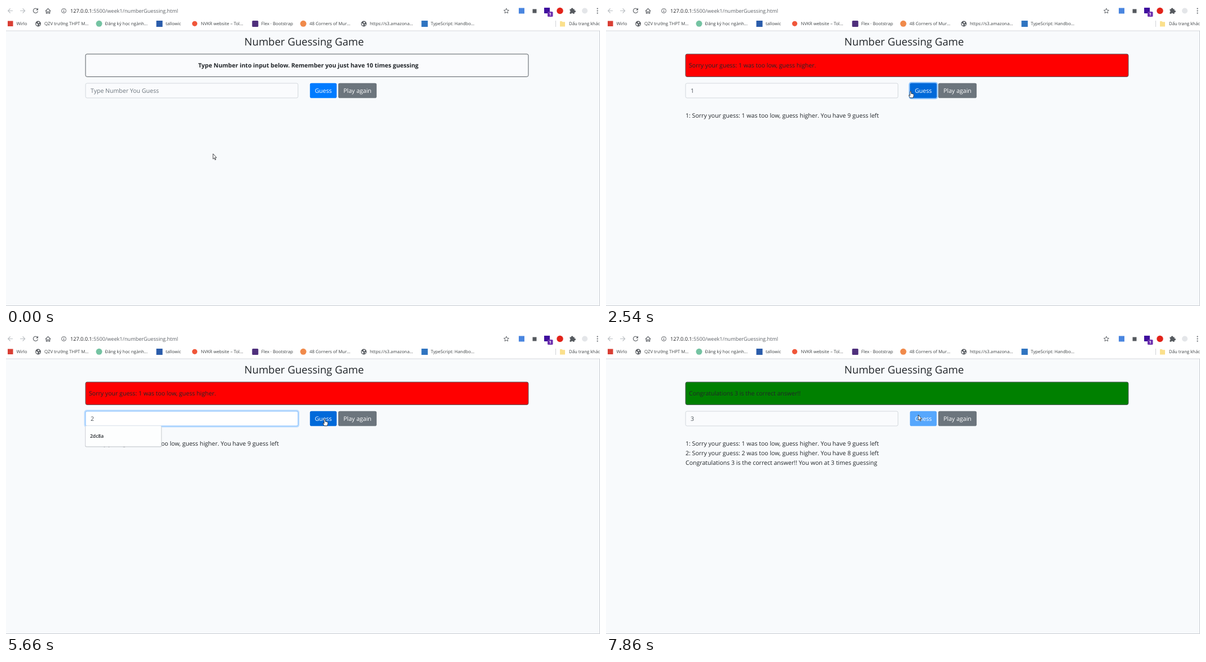
An HTML page that plays this animation: 1053 by 532 pixels, repeating every 8 s.

```html
<!DOCTYPE html>
<html lang="en">
<head>
<meta charset="utf-8">
<title>Number Guessing Game</title>
<style>
  html, body { margin: 0; width: 100%; height: 100%; overflow: hidden; background: #f8fafc; }
  svg { display: block; width: 1053px; height: 532px; }
  text { font: 10.57px "Open Sans", "Noto Sans", sans-serif; fill: #212529; text-rendering: geometricPrecision; white-space: pre; }
  #bar text { font-size: 7.8px; fill: #3c4043; }
  #bar .url { font-size: 9.13px; fill: #5f6368; }
  #bar .host { fill: #202124; }
  #bar .badge { font-size: 7px; font-weight: 700; fill: #fff; }
  .line { fill: none; stroke: #5f6368; stroke-width: 1.2; }
  .off { stroke: #bcc0c4; }
  .title { font-size: 18.5px; font-weight: 500; text-anchor: middle; }
  .hint { font-size: 10.5px; font-weight: 700; text-anchor: middle; }
  .btn { fill: #fff; text-anchor: middle; }
  #list text { font-size: 8.5px; font-weight: 600; }
  .pointer { fill: #fff; stroke: #26282b; stroke-width: .85; stroke-linejoin: round; }
</style>
</head>
<body>
<svg viewBox="0 0 1053 532">
  <defs>
    <g id="globe">
      <circle r="4.9" fill="#55595e"/>
      <path d="M-3.6-1.2 L-1 .2 L-.4 2 L-1.6 3.6 Q-4.2 1.8-3.6-1.2Z M0-3.8 L2.6-2.6 L1.4-.8 L-1-1.4Z M1.4 1 L3.7.6 Q3.2 2.8 1.8 3.3Z" fill="#fff"/>
    </g>
  </defs>
  <rect width="1053" height="532" fill="#f8fafc"/>

  <g id="bar">
    <rect width="1053" height="44" fill="#fff"/>
    <path d="M0 44H1053" stroke="#d5d8dc"/>
    <path class="line off" d="M12 8.5H3.6M7.6 4.5L3.6 8.5L7.6 12.5M25 8.5H33.6M29.6 4.5L33.6 8.5L29.6 12.5"/>
    <path class="line" d="M55.3 5.4A4.1 4.1 0 1 0 56.4 9.4"/>
    <path d="M57 3.6V7.6H53Z" fill="#5f6368"/>
    <path class="line" d="M70 9L74.5 4.6L79 9M71.4 8.2V12.8H73.4V10H75.6V12.8H77.6V8.2"/>
    <circle class="line" cx="102.5" cy="8.5" r="4" style="stroke-width:1"/>
    <path class="line" d="M102.5 8V11M102.5 6V7.1"/>
    <text class="url" x="114" y="12"><tspan class="host">127.0.0.1</tspan>:5500/week1/numberGuessing.html</text>

    <path class="line" style="stroke-width:1" d="M887 4.2L888.3 7.2L891.5 7.5L889.1 9.6L889.8 12.7L887 11.1L884.2 12.7L884.9 9.6L882.5 7.5L885.7 7.2Z"/>
    <rect x="909" y="3.5" width="10" height="10" fill="#4a86e0"/>
    <rect x="933.5" y="5.5" width="7" height="7" fill="#55595e"/>
    <rect x="954" y="3" width="10" height="10" fill="#3f0f9e"/>
    <rect x="960" y="10" width="9.5" height="9" rx="1.5" fill="#6b2fae"/>
    <text class="badge" x="962.7" y="17.2">1</text>
    <circle cx="982" cy="8.5" r="5.7" fill="#e2231a"/>
    <path d="M999.5 5.5H1002A1.7 1.7 0 1 1 1005.3 5.5H1007.7V8A1.7 1.7 0 1 1 1007.7 11.2V13.7H1005.2A1.7 1.7 0 0 0 1002 13.7H999.5V11A1.6 1.6 0 0 0 999.5 8Z" fill="#55595e"/>
    <circle cx="1026" cy="8.5" r="5" fill="#e4e6e9"/>
    <g fill="#5f6368"><circle cx="1048.5" cy="4.6" r="1.1"/><circle cx="1048.5" cy="8.6" r="1.1"/><circle cx="1048.5" cy="12.6" r="1.1"/></g>

    <rect x="3" y="26.5" width="9.5" height="9.5" fill="#d93f34"/>
    <text x="18.5" y="34">Wirlo</text>
    <use href="#globe" x="57" y="31.5"/>
    <text x="68" y="34">QZV trường THPT M...</text>
    <circle cx="165" cy="31.3" r="5.5" fill="#74c3a2"/>
    <text x="175.5" y="34">Đăng ký học ngành...</text>
    <rect x="266.5" y="26" width="11" height="11" fill="#2a5caa"/>
    <text x="283" y="34">tallowic</text>
    <circle cx="334.5" cy="31.3" r="4.6" fill="#f0563a"/>
    <text x="345.5" y="34">NVKR website – Tol...</text>
    <rect x="436.3" y="26" width="11" height="11" rx="1.5" fill="#4f2f7c"/>
    <text x="452.5" y="34">Flex · Bootstrap</text>
    <circle cx="527" cy="31.3" r="5.5" fill="#f08a4b"/>
    <text x="538" y="34">48 Corners of Mur...</text>
    <use href="#globe" x="634.3" y="31.5"/>
    <text x="645" y="34">https://s3.amazona...</text>
    <rect x="736.5" y="26" width="11.2" height="11" fill="#2f74c0"/>
    <text x="753" y="34">TypeScript: Handbo...</text>
    <path d="M974.5 26V37" stroke="#d0d3d7"/>
    <path d="M982 27H985.5L986.6 28.2H991V36.5H982Z" fill="#fbe08c"/>
    <text x="998" y="34">Dấu trang khác</text>
  </g>
  <path d="M1052.5 44V531.5H0" fill="none" stroke="#c9cdd2"/>

  <text class="title" x="528.5" y="69.6">Number Guessing Game</text>
  <rect id="alert" x="141" y="85.2" width="785" height="40.2" rx="2.8" stroke="#454b51" stroke-width=".9"/>
  <text class="hint" id="hint" x="536" y="109.4">Type Number into input below. Remember you just have 10 times guessing</text>
  <text id="result" x="147" y="109.4"></text>

  <rect id="ring" x="138.5" y="134.6" width="381.5" height="31" rx="4.5" fill="#007bff" fill-opacity=".25"/>
  <rect id="field" x="141" y="137" width="376.7" height="26" rx="2.8" stroke-width=".9"/>
  <text id="value" x="150" y="154.4"></text>
  <path id="caret" stroke="#33373b" stroke-width=".9"/>

  <rect id="btnRing" x="536.7" y="134.7" width="51.6" height="30.6" rx="4.5" fill="#268fff" fill-opacity=".5"/>
  <g id="guess">
    <rect id="face" x="538.8" y="136.8" width="47.4" height="26.4" rx="2.8"/>
    <text class="btn" x="562.5" y="154.2">Guess</text>
  </g>
  <rect x="589" y="136.8" width="68" height="26.4" rx="2.8" fill="#6c757d"/>
  <text class="btn" x="623" y="154.2">Play again</text>

  <g id="log">
    <text x="141" y="198.4">1: Sorry your guess: 1 was too low, guess higher. You have 9 guess left</text>
    <text x="141" y="215.1">2: Sorry your guess: 2 was too low, guess higher. You have 8 guess left</text>
    <text x="141" y="231.8">Congratulations 3 is the correct answer!! You won at 3 times guessing</text>
  </g>

  <g id="list">
    <rect id="shade" x="140.2" y="163.5" width="136" rx="2.5" fill="#c3c7cb"/>
    <rect id="sheet" x="140.9" y="162.6" width="134.4" rx="2" fill="#fdfefe" stroke="#d5d9dd" stroke-width=".6"/>
    <g id="items"></g>
  </g>

  <g id="cursor">
    <path id="arrow" class="pointer" d="M0 0V9.3L2.1 7.4L3.6 10.9L5 10.3L3.5 7H6.3Z"/>
    <path id="beam" d="M-2.3-5.6H-.5L0-5.1L.5-5.6H2.3M0-5.1V5.1M-2.3 5.6H-.5L0 5.1L.5 5.6H2.3" fill="none" stroke="#2b2e31" stroke-width=".95"/>
    <path id="hand" class="pointer" d="M-1 .5Q0-.7 1 .5V4.2Q2-.0+3.4 2.8 4.3 2.8 4.4 4.2 5.6 4.2 5.6 5.4V8.4Q5.4 10 4.4 11.8H-.8L-3 8Q-3.4 6.6-2.2 6.8L-1 8Z"/>
  </g>
</svg>
<script>
const LOOP = 8000;
const $ = id => document.getElementById(id);
const set = (id, attrs) => { for (const k in attrs) $(id).setAttribute(k, attrs[k]); };
const show = (el, on) => { el.style.display = on ? '' : 'none'; };

$('hand').setAttribute('d', 'M-1 .6Q0-.6 1 .6V4.2L4.4 4.9Q5.5 5.2 5.5 6.4V8.4L4.4 11.8H-.8L-3 8Q-3.3 6.6-2.2 6.8L-1 8Z');

// Pointer steps: time, x, y, shape
const moves = [
  [0, 367, 262, 'arrow'], [280, 373, 244, 'arrow'], [420, 377, 218, 'arrow'], [550, 381, 176, 'arrow'],
  [670, 382, 144, 'beam'], [820, 377.7, 152, 'beam'], [1690, 449, 145, 'beam'],
  [1840, 529, 148, 'arrow'], [2120, 531, 148, 'arrow'], [2270, 540, 151, 'hand'],
  [2780, 465.7, 138.8, 'beam'], [4750, 490, 138, 'beam'], [4870, 545, 129, 'arrow'],
  [5000, 588, 139, 'arrow'], [5150, 588, 158, 'arrow'], [5280, 585, 175, 'arrow'],
  [5420, 577, 172, 'arrow'], [5540, 566, 156, 'hand'], [5660, 565, 151, 'hand'],
  [6050, 545, 152, 'hand'], [6200, 510, 157, 'beam'], [6330, 497.7, 156.7, 'beam'],
  [7220, 508, 155, 'beam'], [7340, 526, 151, 'arrow'], [7460, 541, 150, 'hand'],
  [7610, 554, 144, 'hand'], [7860, 553.5, 143.5, 'arrow']
];

const BLUE = '#007bff', HOVER = '#0069d9', MID = '#0073ee', ACTIVE = '#0062cc';
const start = { value: '', caret: 0, ring: 0, btnRing: 0, face: BLUE, list: '', rows: 0, disabled: false };

// Page steps: each patch is merged into the state
const steps = [
  [820, { caret: 1, list: '7e30d 2dc8a b40df d448b 5fbf6 3dfca' }],
  [980, { ring: 1 }],
  [1130, { value: '1', list: '' }],
  [1690, { caret: 0 }],
  [2270, { caret: 1 }],
  [2400, { caret: 0, ring: .5, btnRing: .3, face: MID }],
  [2540, { ring: 0, btnRing: 1, face: HOVER, rows: 1 }],
  [2780, { face: BLUE }],
  [3330, { ring: 1, btnRing: 0, caret: 1 }],
  [3760, { caret: 0 }],
  [4040, { value: '2', caret: 1, list: '2dc8a' }],
  [4600, { caret: 0 }],
  [5150, { caret: 1 }],
  [5540, { face: MID }],
  [5660, { face: HOVER, caret: 0 }],
  [5810, { ring: .5, btnRing: .5, face: ACTIVE, list: '' }],
  [5930, { ring: 0, btnRing: 1, face: HOVER, rows: 2 }],
  [6330, { ring: .6, btnRing: 0, face: MID, caret: 1, list: '2dc8a' }],
  [6480, { ring: 1, face: BLUE }],
  [6760, { value: '3', list: '3dfca' }],
  [7220, { caret: 0 }],
  [7610, { ring: .4, btnRing: .5, face: HOVER, list: '' }],
  [7730, { ring: 0, btnRing: 0, face: BLUE, rows: 3, disabled: true }]
];

function drawList(names) {
  show($('list'), names);
  if (!names) return;
  const items = names.split(' '), height = 11.7 + 25.1 * items.length;
  set('sheet', { height });
  set('shade', { height: height + .3 });
  $('items').innerHTML = items.map((s, i) => `<text x="149" y="${183.7 + 25.1 * i}">${s}</text>`).join('');
}

function drawPage(s) {
  const won = s.rows === 3;
  set('alert', { fill: won ? '#008000' : s.rows ? '#ff0000' : '#fafbfd' });
  show($('hint'), !s.rows);
  $('result').textContent = won ? 'Congratulations 3 is the correct answer!!'
    : s.rows ? `Sorry your guess: ${s.rows} was too low, guess higher.` : '';
  [...$('log').children].forEach((row, i) => show(row, i < s.rows));

  set('ring', { opacity: s.ring });
  set('field', { stroke: s.ring ? '#80bdff' : '#ced4da', fill: s.ring ? '#fff' : '#fafbfd' });
  $('value').textContent = s.value || 'Type Number You Guess';
  $('value').style.fill = s.value ? '#495057' : '#6c757d';
  set('caret', { d: `M${s.value ? 156.5 : 150.5} 142.5V157.8`, opacity: s.caret });

  set('btnRing', { opacity: s.btnRing });
  set('face', { fill: s.face });
  set('guess', { opacity: s.disabled ? .65 : 1 });
  drawList(s.list);
}

function drawCursor([, x, y, shape]) {
  set('cursor', { transform: `translate(${x} ${y})` });
  ['arrow', 'beam', 'hand'].forEach(id => show($(id), id === shape));
}

let last = '';
function draw(t) {
  const done = steps.filter(s => s[0] <= t), move = moves.filter(m => m[0] <= t).pop();
  const key = done.length + ':' + move[0];
  if (key === last) return;
  last = key;
  drawPage(Object.assign({}, start, ...done.map(s => s[1])));
  drawCursor(move);
}

const t0 = performance.now();
function tick() {
  draw((performance.now() - t0) % LOOP);
  requestAnimationFrame(tick);
}
tick();
</script>
</body>
</html>
```
